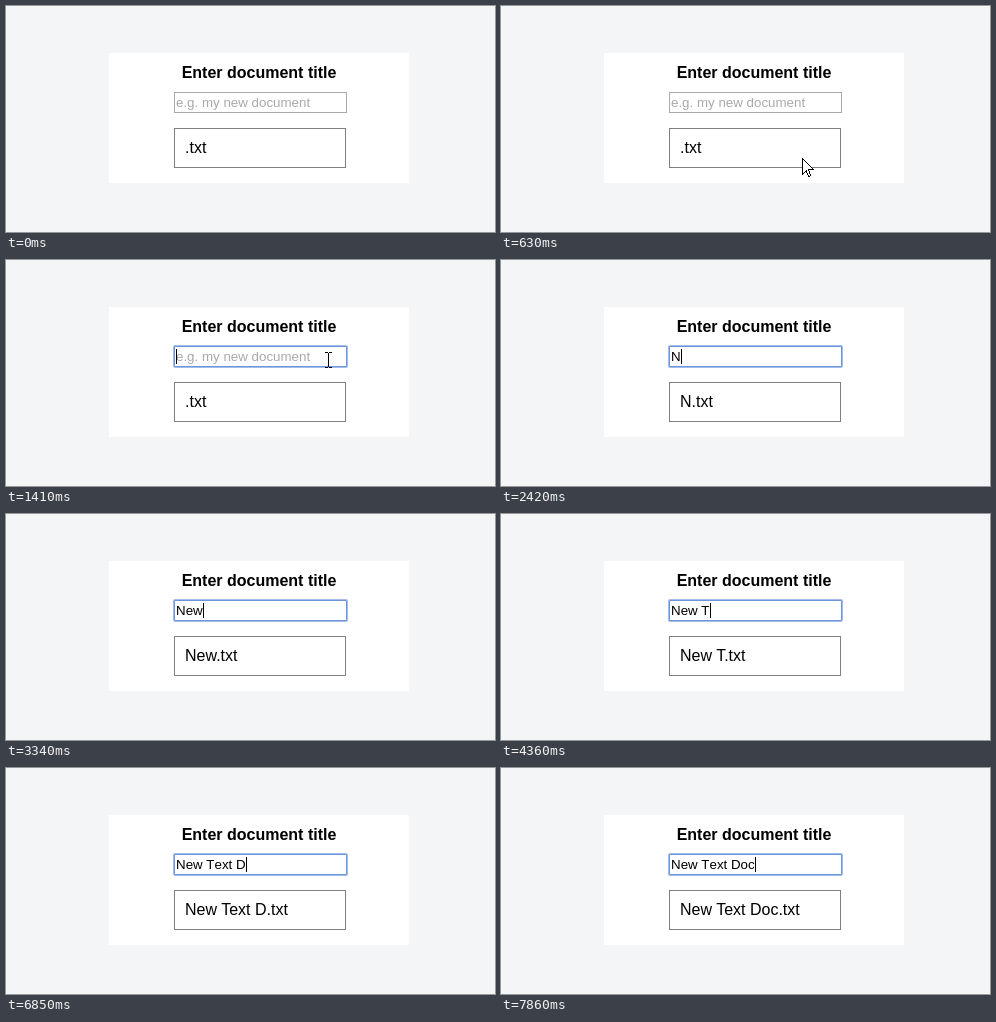
An HTML page for the animation above (8000 ms loop, 489 by 226 pixels).

```html
<!DOCTYPE html>
<html lang="en">
<head>
<meta charset="utf-8">
<title>Document title</title>
<style>
  html, body { margin: 0; width: 100%; height: 100%; overflow: hidden; background: #f3f5f7; }
  body { position: relative; font: 16px/17px "Liberation Sans", Arial, sans-serif; color: #000; }
  div, svg { position: absolute; box-sizing: border-box; white-space: pre; }
  #panel { left: 103px; top: 47px; width: 300px; height: 130px; background: #fff; }
  #heading { left: 103px; top: 58px; width: 300px; text-align: center; font-weight: bold; }
  #field { left: 168px; top: 86px; width: 173px; height: 21px; border: 1px solid #a9a9a9; background: #fff; }
  #field.focus { border-color: #6c95dc; border-radius: 1px; box-shadow: 0 0 0 1px #a3bdeb; }
  #entry { left: 170px; top: 89px; font-size: 13.333px; line-height: 15px; font-kerning: none; }
  #entry.hint { color: #a9a9a9; }
  #caret { top: 89px; width: 1px; height: 15px; background: #000; }
  #result { left: 168px; top: 122px; width: 172px; height: 40px; border: 1px solid #808080; padding: 10px; }
  svg { left: 0; top: 0; overflow: visible; shape-rendering: crispEdges; }
</style>
</head>
<body>
<div id="panel"></div>
<div id="heading">Enter document title</div>
<div id="field"></div>
<div id="entry"></div>
<div id="caret"></div>
<div id="result"></div>
<svg id="arrow" width="13" height="20">
  <path d="M.5 .5V16.5L4.2 12.9L6.8 18.5L8.8 17.6L6.4 11.9H11.7Z" fill="#fff" stroke="#000"/>
</svg>
<svg id="beam" width="7" height="16">
  <path d="M0 0h3v1h1v-1h3v1h-3v14h3v1h-3v-1h-1v1h-3v-1h3v-14h-3z"/>
</svg>
<script>
  const LOOP = 8000;
  const TITLE = "New Text Doc";
  const HINT = "e.g. my new document";
  const FOCUS = 1410;
  const POINTER = { from: 460, to: 1250, gone: 1640 };
  const PATH = [[297, 200], [299, 176], [301, 152], [305, 135], [310, 121], [314, 111],
                [318, 105], [321, 102], [323, 100], [324, 100], [322, 100]];
  const KEYS = [2420, 2880, 3340, 3890, 4360, 4910, 5370, 5830, 6380, 6850, 7400, 7860];
  const CARETS = [170, 180, 187, 197, 201, 209, 215, 222, 226, 230, 240, 247, 254];

  const [field, entry, caret, result, arrow, beam] =
    ["field", "entry", "caret", "result", "arrow", "beam"].map(id => document.getElementById(id));
  const show = (el, on) => { el.style.visibility = on ? "visible" : "hidden"; };
  const place = (el, x, y) => { el.style.transform = `translate(${x}px, ${y}px)`; };
  const setText = (el, text) => { if (el.textContent !== text) el.textContent = text; };

  function drawPointer(t) {
    const visible = t >= POINTER.from && t < POINTER.gone;
    const last = PATH.length - 1;
    const progress = (t - POINTER.from) / (POINTER.to - POINTER.from);
    const step = Math.max(0, Math.min(last, Math.floor(progress * last + 1e-6)));
    const [x, y] = PATH[step];
    const overField = y < 107;
    show(arrow, visible && !overField);
    show(beam, visible && overField);
    place(arrow, x, y);
    place(beam, x - 3, y - 8);
  }

  function drawText(t) {
    const count = KEYS.filter(time => t >= time).length;
    const typed = TITLE.slice(0, count);
    setText(entry, typed || HINT);
    entry.classList.toggle("hint", !count);
    setText(result, typed.trim() + ".txt");
    field.classList.toggle("focus", t >= FOCUS);
    show(caret, t >= FOCUS && !(t >= 1960 && t < 2170));
    caret.style.left = CARETS[count] + "px";
  }

  const start = performance.now();
  function frame() {
    const t = (performance.now() - start) % LOOP;
    drawPointer(t);
    drawText(t);
    requestAnimationFrame(frame);
  }
  frame();
</script>
</body>
</html>
```
